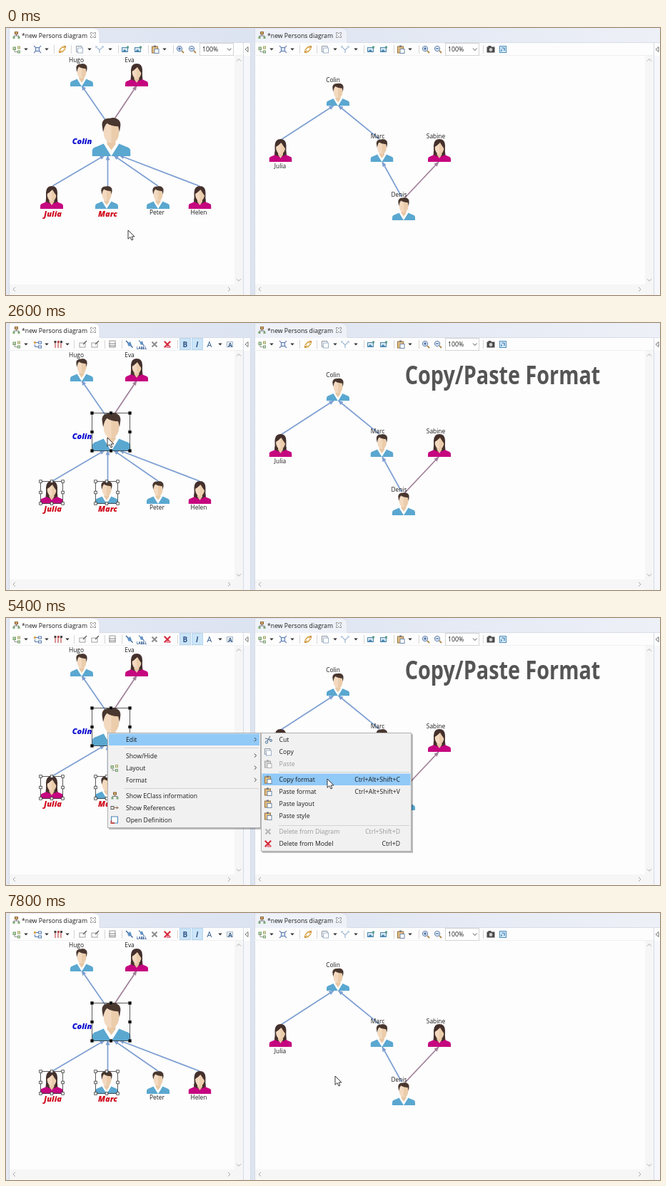
An HTML page that plays this animation: 916x375 px, repeating every 8000 ms.

```html
<!DOCTYPE html>
<html lang="en">
<head>
<meta charset="utf-8">
<title>Copy/Paste Format</title>
<style>
  html, body { margin: 0; width: 100%; height: 100%; overflow: hidden; background: #fff; }
  svg { display: block; font: 8.7px "Open Sans", "Noto Sans", sans-serif; fill: #1c1c1c; }
  .name { font-size: 8.4px; text-anchor: middle; }
  .styled { font-size: 11px; font-weight: 800; font-style: italic; text-anchor: middle; }
  .off { fill: #9a9a9a; }
  .end { text-anchor: end; }
  .title { font-size: 36px; font-weight: 700; fill: #555; text-anchor: middle; }
</style>
</head>
<body>
<svg id="stage" width="916" height="375" viewBox="0 0 916 375"></svg>
<script>
const LOOP = 8000, STEP = 200;
const BLUE = '#7d9fd2', MAUVE = '#a07f98';

const rect = (x, y, w, h, fill, stroke = 'none') =>
  `<rect x="${x}" y="${y}" width="${w}" height="${h}" fill="${fill}" stroke="${stroke}"/>`;
const line = (d, color = '#888', width = 1) =>
  `<path d="${d}" fill="none" stroke="${color}" stroke-width="${width}"/>`;
const shape = (d, fill) => `<path d="${d}" fill="${fill}"/>`;
const text = (x, y, s, cls = '', extra = '') => `<text x="${x}" y="${y}" class="${cls}" ${extra}>${s}</text>`;
const group = (id, body, extra = '') => `<g id="${id}" ${extra}>${body}</g>`;

// Icons, centred on the origin
const cross = (color, r = 3.5) => line(`M${-r} ${-r}L${r} ${r}M${r} ${-r}L${-r} ${r}`, color, 2.2);
const page = line('M-4.5 -4.5h7.5v8h-7.5z', '#8c97a3') + rect(-2.5, -2, 7, 7, '#fff', '#9db2c8');
const clip = rect(-4.5, -4, 8, 9, '#e3bf83', '#957244') + rect(-2, -5.5, 3, 2.5, '#777') + rect(-1, -.5, 6, 6, '#fff', '#6d88a8');
const glass = sign => line('M2 2L5 5', '#b08a4a', 1.8) +
  `<circle cx="-1" cy="-1" r="3.6" fill="#eaf3fc" stroke="#5577a5"/>` + line(sign, '#29528d', 1.1);
const pin = line('M-5 -5L4.5 4.5', '#2c5a94', 1.3) + shape('M-3 -1L1 -4L3 1L-1 3z', '#5d90c6');
const ICONS = {
  tree: rect(-1.5, -4.5, 4, 3, '#d8b074', '#876030') + line('M.5 -1V1M-3 3V1H4V3', '#777') +
    rect(-4.5, 2, 3, 3, '#7ca978') + rect(2.5, 2, 3, 3, '#7ca978'),
  blocks: rect(-5, -3, 3.5, 3.5, '#b9d3b0', '#7aa070') + rect(1.5, -4, 3, 3, '#e8e4bd', '#a3a86a') +
    rect(1.5, 2, 3, 3, '#cfe3cc', '#7aa070') + line('M-3 1V3.5H1', '#999'),
  links: rect(-5, -4, 3, 3, '#d8a750') + line('M-2 -2.5H1M-3.5 0V3.5H1', '#5279ad') +
    rect(1.5, -4, 4, 3, '#fff', '#5279ad') + rect(1.5, 2, 4, 3, '#fff', '#5279ad'),
  columns: line('M-4 -4V5M0 -4V5M4 -4V5', '#c05050', 1.2) + rect(-5.5, -5, 3, 3, '#444') + rect(-1, -5, 3, 3, '#c05050') + rect(3, -5, 3, 3, '#444'),
  select: line('M-5 -5L5 5M5 -5L-5 5', '#6f87b5', 1.2) + rect(-2.5, -2.5, 5, 5, '#dce7f7', '#5b79ad'),
  refresh: line('M-4 1L0 -3.5L3 -2M4 -1L0 3.5L-3 2', '#dca94e', 1.7) + shape('M1 -5h4v4zM-1 5h-4v-4z', '#c99238'),
  page,
  route: line('M-5 -4L0 1L5 -4M0 1V5', '#9cb5cf', 1.2) + rect(-6, -5, 3, 3, '#c3d4e5') + rect(3, -5, 3, 3, '#c3d4e5'),
  image: rect(-4.5, -2.5, 8, 6, '#d5e7f2', '#4c86ae') + shape('M-4 3L-1 0L2.5 3z', '#4584ad') + rect(2, -4.5, 3, 3, '#5c9b8b'),
  clip,
  zoomIn: glass('M-3 -1H1M-1 -3V1'),
  zoomOut: glass('M-3 -1H1'),
  camera: rect(-5.5, -3.5, 11, 8, '#4a4a4a') + rect(-3.5, -5, 4, 2, '#4a4a4a') + '<circle cx="0" cy=".5" r="2.4" fill="#ccc"/>',
  layers: rect(-4.5, -4.5, 9, 9, '#d8ebf8', '#4b8dbd') + line('M-2 -2H2V2M-2 0V3', '#3477aa', 1.2),
  pinBox: rect(-5, -2, 8, 6, '#fff', '#a0a0a0') + line('M0 0L5 -5', '#666', 1.4),
  stack: rect(-4, -5, 8, 9, '#fafafa', '#999') + line('M-5 -1H5M-5 2H5', '#888', 1.2),
  pin,
  label: `<g transform="translate(0 -1.5) scale(.8)">${pin}</g>` + text(0, 6.5, 'LABEL', '', 'font-size="4.6" font-weight="700" fill="#24508c" text-anchor="middle"'),
  grayCross: cross('#909090'),
  redCross: cross('#d52b3c', 4.2) + rect(-1.5, 2, 5, 3, '#e8869a'),
  fontBox: rect(-4.5, -3.5, 8, 7, '#f0f4f8', '#a3b4c6') + text(-3, 3.5, 'A', '', 'fill="#315887" font-weight="700"'),
  scissors: line('M3 -5L-1 2M-4 -2L3 0', '#61788f', 1.2) + '<circle cx="-2" cy="3.5" r="1.7" fill="none" stroke="#48719c"/><circle cx="4" cy="1" r="1.5" fill="none" stroke="#48719c"/>',
  reference: rect(-5, -2, 4, 4, '#fff', '#555') + line('M-1 0H5M3 -2L5 0L3 2', '#8a6044'),
  definition: rect(-4.5, -4.5, 9, 9, '#fff', '#4a83b4') + line('M-4.5 1V4.5H0', '#c05050', 2),
};
const icon = (name, x, y = 30, extra = '') => `<g transform="translate(${x} ${y})" ${extra}>${ICONS[name]}</g>`;
const icons = (list, dx = 0) => Object.entries(list).map(([x, name]) => icon(name, +x + dx)).join('');
const carets = (...xs) => xs.map(x => shape(`M${x - 2.7} 28.5h5.4l-2.7 3z`, '#333')).join('');
const bars = (...xs) => xs.map(x => line(`M${x + .5} 24V36`, '#d6d6d6')).join('');

function defaultTools(dx) {
  return icons({ 15: 'blocks', 44: 'select', 79: 'refresh', 103: 'page', 131: 'route', 167: 'image',
    185: 'image', 209: 'clip', 244: 'zoomIn', 261: 'zoomOut' }, dx) +
    carets(...[28, 57, 117, 146, 222].map(x => x + dx)) + bars(...[67, 91, 157, 199, 234].map(x => x + dx)) +
    rect(271.5 + dx, 21.5, 47, 17, '#fff', '#d4d4d4') + text(275 + dx, 33, '100%') +
    line(`M${310 + dx} 28.5l2.7 3l2.7 -3`, '#555');
}

const selectionTools = icons({ 15: 'blocks', 44: 'links', 73: 'columns', 108: 'pinBox', 125: 'pinBox', 149: 'stack',
    173: 'pin', 190: 'label', 208: 'grayCross', 226: 'redCross', 314: 'fontBox' }) +
  carets(28, 57, 86, 300) + bars(95, 138, 162, 240) +
  rect(243.5, 21.5, 15, 16, '#cce4f7', '#b5d6ef') + rect(260.5, 21.5, 15, 16, '#cce4f7', '#b5d6ef') +
  text(247.5, 33.5, 'B', '', 'font-size="10" font-weight="700" fill="#2d5586"') +
  text(266, 33.5, 'I', '', 'font-size="10" font-weight="700" font-style="italic" fill="#2d5586"') +
  text(281.5, 33.5, 'A', '', 'font-size="10.5" fill="#2d5586"');

function pane(x, right, tabEnd, tabFill) {
  const bar = right - 12;
  return rect(x, 20, right - x + 10, 355, '#fdfdfd') +
    shape(`M${x} 21V1H${tabEnd - 6}Q${tabEnd} 1 ${tabEnd} 8V21z`, tabFill) +
    line(`M${tabEnd - 8} .5Q${tabEnd} .5 ${tabEnd} 8V20.5H${right + 10}`, '#d9dde7') +
    line(`M${x + .5} 0V375`, '#d5dae6') + line(`M${x} 38.5H${right}`, '#f0f0f0') +
    rect(bar, 39, 12, 336, '#f6f6f6') + rect(x + 1, 360, right - x - 1, 14, '#f6f6f6') +
    line(`M${right + .5} 21V375M${right + 10.5} 21V375`, '#d6dbe5') + rect(right + 1, 39, 9, 336, '#f5f7fa') +
    line(`M${bar + 3} 46.5l3 -3l3 3M${bar + 3} 352.5l3 3l3 -3M${x + 9} 364l-3 3l3 3M${bar - 9} 364l3 3l-3 3`, '#a8a8a8') +
    line(`M${right + 7} 26.5v7l-4 -3.5z`, '#666', .9) +
    icon('tree', x + 10, 10) + text(x + 18, 13.5, '*new Persons diagram') +
    `<g transform="translate(${x + 118} 10)">` + line('M-3.5 -3.5H-1.5L0 -2L1.5 -3.5H3.5V-1.5L2 0L3.5 1.5V3.5H1.5L0 2L-1.5 3.5H-3.5V1.5L-2 0L-3.5 -1.5z', '#8a8a8a', .9) + '</g>';
}

const neck = shape('M12.5 16H19.5V22L16 27L12.5 22z', '#e8c8a6');
const face = '<ellipse cx="16" cy="12" rx="6.4" ry="9" fill="#f3d9bf"/>' + shape('M16 3A6.4 9 0 0 1 16 21z', '#ebcdac');
const torso = color => shape('M0 32V28Q0 25 4 24L11 21H21L28 24Q32 25 32 28V32z', color);
const symbols = `<defs>
  <symbol id="man" viewBox="0 0 32 32">${torso('#5aa7d0')}${shape('M9.5 21.5L11.5 20H20.5L22.5 21.5L16 32z', '#fff')}${neck}${face}
    ${shape('M9.2 12L8.3 6Q8.2 .3 15 .4L17 0Q24 .5 23.6 6.5L22.8 12L21.7 7.2Q15 7 12.5 4.6Q10.8 6 10.3 8z', '#49372f')}</symbol>
  <symbol id="woman" viewBox="0 0 32 32">${shape('M7.5 23Q8.5 16 8 9Q8.5 0 16 0Q23.8 0 24 9Q23.5 17 24.5 23L20 25H12z', '#44302c')}
    ${torso('#c5067f')}${shape('M8 18H24L23.5 22L20 24H12L8.2 22z', '#44302c')}${neck}${face}${shape('M9 14V7Q10 1.5 16 1.5Q22.5 1.5 23 8V14Q20 10 17 5Q13 9 9.5 11z', '#44302c')}</symbol>
  ${[['b', BLUE], ['m', MAUVE]].map(([id, c]) => `<marker id="${id}" viewBox="0 0 7 6" refX="6.5" refY="3" markerWidth="7" markerHeight="6" markerUnits="userSpaceOnUse" orient="auto">${shape('M0 0L7 3L0 6z', c)}</marker>`).join('')}
  <linearGradient id="frame"><stop stop-color="#e4e9f4"/><stop offset=".37" stop-color="#dde4f1"/><stop offset="1" stop-color="#edf0f7"/></linearGradient>
</defs>`;

const person = (kind, x, y, size = 32) => `<use href="#${kind}" x="${x}" y="${y}" width="${size}" height="${size}"/>`;
const edge = (x1, y1, x2, y2, m = 'b') =>
  `<path d="M${x1} ${y1}L${x2} ${y2}" stroke="${m === 'b' ? BLUE : MAUVE}" stroke-width="1.7" marker-end="url(#${m})"/>`;

const diagrams =
  edge(139, 129, 106, 81) + edge(151, 129, 183, 81, 'm') + edge(65, 222, 138, 179) +
  edge(142.5, 222, 142.5, 179) + edge(213, 222, 151, 179) + edge(271, 222, 159, 179) +
  edge(385, 157, 459, 109) + edge(523, 156, 465.5, 109) + edge(554, 237, 527, 188) + edge(559, 238, 606, 188, 'm') +
  person('man', 90, 50) + person('woman', 167, 50) + person('man', 120.5, 126, 54) +
  person('woman', 48, 222) + person('man', 125, 222) + person('man', 197, 222) + person('woman', 255.5, 222) +
  person('man', 449, 77.5) + person('woman', 368.5, 156) + person('man', 510.5, 156) +
  person('woman', 591, 156) + person('man', 541, 238) +
  [['Hugo', 98.5, 48], ['Eva', 173, 48], ['Peter', 211.5, 262], ['Helen', 270, 262], ['Colin', 458, 75.5],
   ['Julia', 384, 197], ['Marc', 520.5, 155], ['Sabine', 602, 155], ['Denis', 550.5, 237]]
    .map(([s, x, y]) => text(x, y, s, 'name')).join('') +
  text(106.5, 162.5, 'Colin', 'styled', 'fill="#0a0ad0"') +
  text(65.5, 265, 'Julia', 'styled', 'fill="#d00a1c"') + text(142.5, 265, 'Marc', 'styled', 'fill="#d00a1c"');

function selection(id, x, y, size) {
  let handles = '';
  for (let i = 0; i < 9; i++) if (i !== 4)
    handles += `<rect x="${x + i % 3 * size / 2 - 1.8}" y="${y + (i / 3 | 0) * size / 2 - 1.8}" width="3.6" height="3.6"/>`;
  return group(id, `<rect x="${x}" y="${y}" width="${size}" height="${size}" fill="none"/>${handles}`, 'stroke="#333" stroke-width=".8"');
}

const menuPanel = (x, y, w, h) => rect(x + 2, y + 2, w, h, '#0004') + rect(x + .5, y + .5, w - 1, h - 1, '#f1f1f1', '#b0b0b0');
const highlight = (id, x, y, w) => group(id, rect(x, y, w, 16.5, '#91c9f7'));
const rule = (x, y, w) => line(`M${x} ${y}h${w}`, '#d3d3d3');

const menu = menuPanel(142, 161, 215, 134) + highlight('editRow', 144, 162.5, 211) +
  [['Edit', 174], ['Show/Hide', 196.5], ['Layout', 213.5, 'blocks'], ['Format', 230.5], ['Show EClass information', 252.5, 'tree'],
   ['Show References', 269.5, 'reference'], ['Open Definition', 286.5, 'definition']].map(([s, y, name], i) =>
    text(168, y, s) + (name ? icon(name, 152, y - 3) : '') +
    (i < 4 ? line(`M348 ${y - 6}l2.5 2.7l-2.5 2.7`, '#444') : '')).join('') +
  rule(166, 182.5, 188) + rule(166, 239.5, 188);

const submenu = menuPanel(357, 161, 211, 167) + highlight('copyRow', 358.5, 218.5, 208) +
  [['Cut', 174, 'scissors'], ['Copy', 191, 'page'], ['Paste', 208, 'clip', '', 1],
   ['Copy format', 230, 'clip', 'Ctrl+Alt+Shift+C'], ['Paste format', 247, 'clip', 'Ctrl+Alt+Shift+V'],
   ['Paste layout', 264, 'clip'], ['Paste style', 281, 'clip'],
   ['Delete from Diagram', 303, 'grayCross', 'Ctrl+Shift+D', 1], ['Delete from Model', 320, 'redCross', 'Ctrl+D']]
    .map(([s, y, name, keys = '', off]) => {
      const cls = off ? 'off' : '';
      return icon(name, 367, y - 3, off ? 'opacity=".6" style="filter:grayscale(1)"' : '') +
        text(382.5, y, s, cls) + text(552, y, keys, 'end ' + cls);
    }).join('') +
  rule(382, 216.5, 183) + rule(382, 291.5, 183);

// Condensed lettering
const title = `<g transform="translate(695.5 85.5) scale(.8 1)">${text(0, 0, 'Copy/Paste Format', 'title')}</g>`;

const stage = document.getElementById('stage');
stage.innerHTML = symbols + rect(0, 0, 916, 375, 'url(#frame)') +
  pane(4, 332, 131, '#fff') + pane(348, 907, 478, '#eef1f8') +
  group('idleTools', defaultTools(0)) + group('selectionTools', selectionTools) +
  defaultTools(344) + bars(668) + icon('camera', 679) + icon('layers', 696) + diagrams +
  selection('julia', 48.5, 222.5, 31) + selection('marc', 125.5, 222.5, 31) + selection('colin', 120.5, 126.5, 53) +
  group('title', title) + group('menu', menu) + group('submenu', submenu) +
  group('cursor', '<path d="M0 0V12.3L2.9 9.6L5 14L6.9 13.1L5 9H9z" fill="#fff" stroke="#222" stroke-width=".9"/>');

const el = id => document.getElementById(id);
const show = (id, on) => el(id).setAttribute('visibility', on ? 'visible' : 'hidden');
const fillSelection = (id, primary) => el(id).setAttribute('fill', primary ? '#000' : '#fff');
const clamp = v => Math.max(0, Math.min(1, v));

// time, x, y of the pointer tip
const POINTER = [[0, 171, 284], [200, 171, 284], [600, 144.5, 241], [1200, 144.5, 241], [1600, 66, 239], [1800, 66, 239],
  [2400, 142, 161], [3800, 142, 161], [4200, 163, 169], [4600, 163, 169], [5000, 368, 172], [5400, 450, 226],
  [7200, 450, 226], [7800, 461, 229], [LOOP, 461, 229]];

function pointerAt(t) {
  const i = POINTER.findIndex(p => p[0] > t);
  const [t0, x0, y0] = POINTER[i - 1], [t1, x1, y1] = POINTER[i];
  const k = (t - t0) / (t1 - t0), e = k * k * (3 - 2 * k);
  return [x0 + (x1 - x0) * e, y0 + (y1 - y0) * e];
}

function draw(now) {
  const t = Math.floor(now % LOOP / STEP) * STEP;
  const selected = t >= 600, open = t < 7200;
  show('idleTools', !selected);
  show('selectionTools', selected);
  show('marc', selected);
  show('julia', t >= 1800);
  show('colin', t >= 2600);
  fillSelection('marc', t < 1800);
  fillSelection('julia', t < 2600);
  fillSelection('colin', true);
  show('menu', open && t >= 3800);
  show('editRow', open && t >= 4200);
  show('submenu', open && t >= 4400);
  show('copyRow', open && t >= 5400);
  el('title').setAttribute('opacity', clamp(t / 800) * clamp((7800 - t) / 600));
  el('cursor').setAttribute('transform', `translate(${pointerAt(t)})`);
  requestAnimationFrame(draw);
}
requestAnimationFrame(draw);
</script>
</body>
</html>
```
